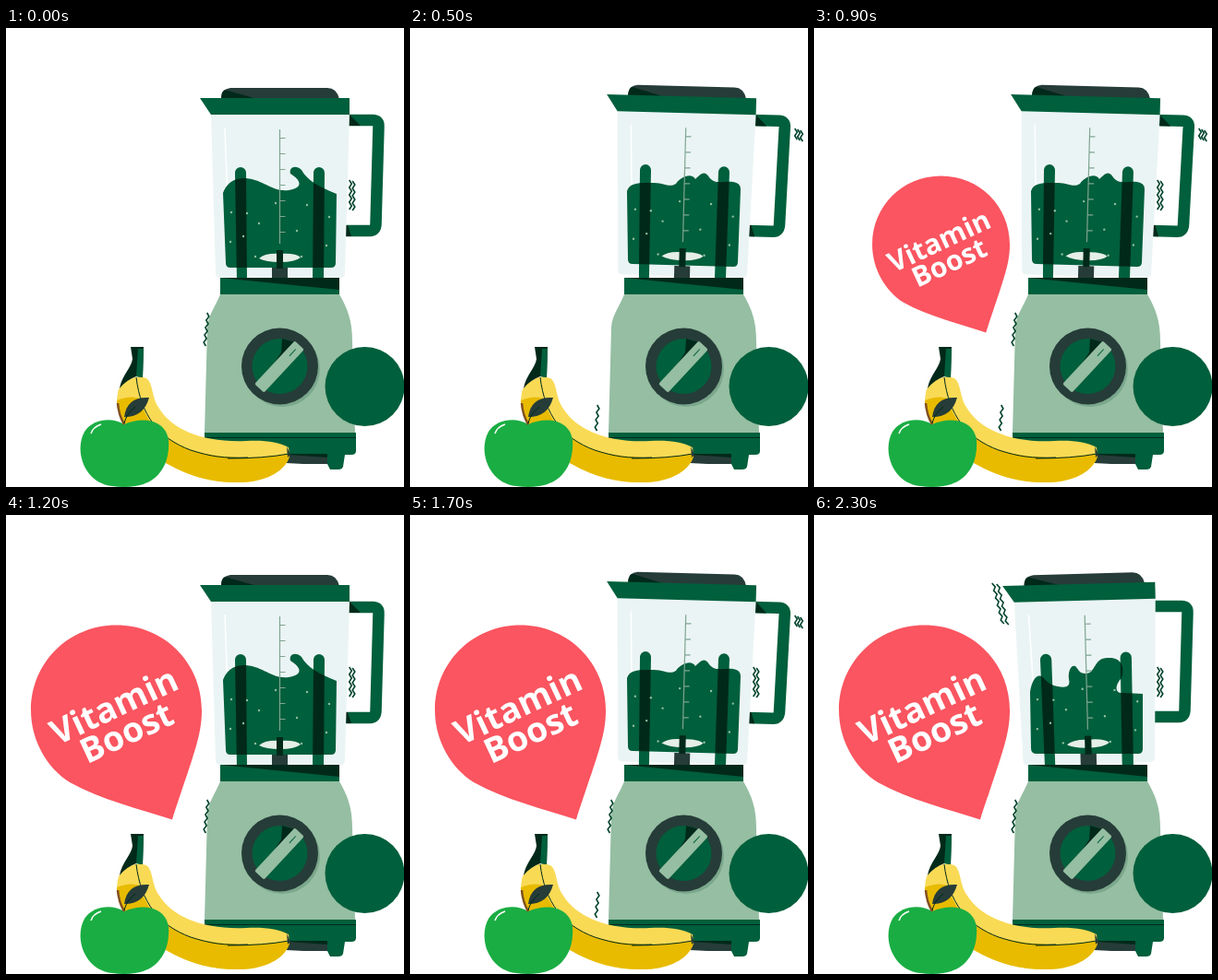
Write an HTML page that moves like this. It is 431 px wide and 498 px high and loops after 2.4 s.

```html
<!DOCTYPE html>
<html lang="en">
<head>
<meta charset="utf-8">
<title>Blender</title>
<style>
  html, body { margin: 0; width: 100%; height: 100%; overflow: hidden; background: #fff; }
  svg { display: block; width: 431px; height: 498px; }
  text { font: 700 37.5px "Open Sans", "Noto Sans", sans-serif; fill: #fff; text-anchor: middle; }
  .green { fill: #005f3c; }
  .deep { fill: #00291a; }
  .slate { fill: #263c38; }
  .mint { fill: #95bea2; }
  .line { fill: none; stroke: #00291a; stroke-width: 1; }
  .shake { fill: none; stroke: #00442c; stroke-width: 1.6; }
</style>
</head>
<body>
<svg viewBox="0 0 431 498">
  <g id="jars"></g>

  <!-- motor base -->
  <path class="slate" d="M300 461H348V473H322L303 472Z"/>
  <path class="deep" d="M300 461H348V466L306 463Z"/>
  <path class="green" d="M215 439H379V459Q379 463 374 463H367L365 476Q364 479 360 479H351L348 473V462H215Z"/>
  <path class="mint" d="M232 289H361C370 305 375 317 375 340L378 439H215L218 325C219 311 226 304 232 289Z"/>
  <path class="line" d="M215 444.5H379"/>
  <path class="green" d="M232 271H361V289H232Z"/>
  <path class="deep" d="M232 271H361V284Z"/>

  <!-- dial -->
  <circle cx="299" cy="370" r="41" fill="#7ba78c"/>
  <circle class="slate" cx="296.500" cy="367" r="41.5"/>
  <circle class="green" cx="296.500" cy="367" r="30"/>
  <path class="deep" d="M299 337L313 341L280 380L298 352Z"/>
  <g transform="translate(296 367.5) rotate(-47)">
    <rect class="mint" x="-32" y="-7" width="64" height="14" rx="2"/>
    <path d="M16 0H26" stroke="#005f3c"/>
  </g>

  <circle class="green" cx="388.5" cy="389" r="43"/>

  <!-- banana -->
  <path fill="#f9da55" d="M122 392C130 380 142 376 152 380C160 386 157 400 166 413C181 437 215 450 260 448C280 447 295 449 306 455L307 465C302 480 285 490 262 492.500C235 495 205 490 175 473C150 460 125 435 120 408Q120 398 122 392Z"/>
  <path fill="#e8bb00" d="M120 404Q134 398 145 402C150 425 168 446 200 458C235 468 270 468 307 462V465C302 480 285 490 262 492.500C235 495 205 490 175 473C150 460 125 435 120 408Z"/>
  <path class="line" d="M141 379C146 420 165 445 200 458C222 465 235 467 262 466M240 467Q280 467 306 462"/>
  <path class="deep" d="M135 346H149L148 379L141 378Q130 382 123 391C125 378 136 368 137 359Z"/>
  <path class="green" d="M143 348H149L148 379L141 378Z"/>
  <path class="slate" d="M304 454L308 463L305 466Z"/>

  <!-- apple -->
  <path fill="#1aad43" d="M128 430C115 422 94 424 85 438C73 460 86 494 115 497Q128 499 140 497C164 494 178 474 176 447C173 425 148 421 128 430Z"/>
  <path d="M92 440Q94 433 103 430" fill="none" stroke="#fff" stroke-width="1.5"/>
  <path d="M121 407Q122 420 128 430" fill="none" stroke="#805020" stroke-width="2.5"/>
  <path class="slate" d="M128 422C130 406 140 400 155 401C151 415 143 422 128 422Z"/>
  <path class="line" d="M128 429Q130 419 140 411"/>

  <g id="shakes"></g>

  <g id="drop">
    <path fill="#fa5560" d="M180 330.500C145 319 103 309 69 290C45 275 27 245 27 212C27 160 68 119.5 119.5 119.5C171 119.5 212 160 212 212C212 240 203 260 180 330.500Z"/>
    <g transform="translate(122.5 219) rotate(-25)">
      <text>Vitamin</text>
      <text y="32">Boost</text>
    </g>
  </g>
</svg>
<script>
const $ = id => document.getElementById(id);

// Jar poses: upright, tipped right, tipped left
const tipRight = "translate(-2 -2) rotate(1.5 290 271)";
const poses = [
  { move: "", grip: "", joints: true,
    liquid: "M235 179C238 170 246 162 260 163C280 165 288 178 306 176C320 174 322 167 308 158C306 151 314 148 320 154C326 165 338 172 358 180L357 255Q357 260 352 260H243Q238 260 238 255Z" },
  { move: tipRight, grip: tipRight, joints: true,
    liquid: "M235 177C238 167 250 168 262 168C275 167 280 174 288 169C292 162 305 156 309 164C314 160 318 153 324 162C330 170 338 166 350 167Q358 168 358 175L355 254Q355 259 350 259L241 256Q236 256 236 251Z" },
  { move: "translate(-5 -1) rotate(-1.5 290 271) scale(1.02 1)", grip: "translate(1 -1)", joints: false,
    liquid: "M234 192C236 178 242 171 248 176C254 183 258 185 264 186C273 188 278 186 276 178C275 170 278 162 283 164C287 168 287 172 294 172C306 172 302 155 318 155C333 154 337 165 333 177C326 184 325 194 335 193L356 194V254Q356 259 351 259H241Q235 259 235 253Z" }
];

const specks = [[244,200],[261,201],[274,212],[292,190],[315,220],[326,192],[350,205],
  [243,232],[257,226],[347,236],[270,248],[320,248]];
const bars = '<path d="M248 157a6 6 0 0 1 12 0L261 275H250ZM333 157a6 6 0 0 1 12 0L344 275H332Z"/>';
const ticks = [...Array(7)].map((_, i) => `M296.5 ${119.5 + 17 * i}h6`).join("");
const dots = specks.map(([x, y]) => `<circle cx="${x}" cy="${y}" r="1.2"/>`).join("");

const jar = ({ move, grip, joints, liquid }, i) => `<g>
  <g transform="${grip}">
    <path d="M368 100H397Q404 100 403.5 107L400.5 213Q400 220 394 220H366" fill="none" stroke="#005f3c" stroke-width="12.5"/>
    ${joints ? '<path class="deep" d="M372 94L384 106H372ZM368 214H370L374 226H367Z"/>' : ""}
  </g>
  <g transform="${move}">
    <path class="slate" d="M233 77Q233 66 243 65H348Q358 65 361 77Z"/>
    <path class="deep" d="M233 77Q233 69 237 67L272 77Z"/>
    <path fill="#ebf4f4" d="M222 93H372L367 266Q367 271 362 271H232Q227 271 227 266Z"/>
    <path class="green" d="M210 76H372V94H222Z"/>
    <path d="M237 108L240 189" stroke="#fff" stroke-width="1.5"/>
    <g class="green">${bars}</g>
  </g>
  <clipPath id="fill${i}"><path d="${liquid}"/></clipPath>
  <path class="green" d="${liquid}"/>
  <g clip-path="url(#fill${i})"><g class="deep" transform="${move}">${bars}</g></g>
  <g transform="${move}">
    <g fill="#8fbd9f">${dots}</g>
    <path d="M296.5 110V234${ticks}" fill="none" stroke="#7fa591" stroke-width="1.2"/>
    <path class="slate" d="M288 260H305V273H288Z"/>
    <path fill="#e6eee8" d="M274 250Q280 244 297 245Q314 244 319 249Q313 254 297 254Q281 254 274 250Z"/>
    <path class="deep" d="M293 241H300V261H293Z"/>
  </g>
</g>`;

// Parallel zigzags running from (x, y), leaning by slant over their height
function zigzags(x, y, height, slant, count, gap) {
  let d = "";
  for (let c = 0; c < count; c++) {
    for (let k = 0; k * 4 <= height; k++) {
      const px = x + c * gap + slant * k * 4 / height + (k % 2 ? 1.3 : -1.3);
      d += `${k ? "L" : "M"}${px} ${y + k * 4 + c}`;
    }
  }
  return `<path d="${d}"/>`;
}

$("jars").innerHTML = poses.map(jar).join("");
$("shakes").innerHTML = [
  zigzags(373, 165, 33, 0, 2, 3.5) + zigzags(219, 309, 36, -4, 1, 0),
  zigzags(418, 109, 12, 0, 3, 3) + zigzags(204, 409, 30, -3, 1, 0),
  zigzags(194, 74, 46, 11, 2, 5)
].map(s => `<g class="shake">${s}</g>`).join("");

const jars = [...$("jars").children], shakes = [...$("shakes").children];
const show = (el, on) => el.style.display = on ? "" : "none";

function draw() {
  const step = Math.floor(performance.now() % 2400 / 100);
  const pose = [0, 1, 0, 2][step % 4];
  jars.forEach((el, i) => show(el, i === pose));
  shakes.forEach((el, i) => show(el, i === pose || (i === 0 && step > 6)));

  // The drop grows from its lower right corner with a small overshoot
  const scale = step === 11 ? 1.043 : Math.min(1, 0.22 + (step - 6) * 0.195);
  show($("drop"), step > 5);
  $("drop").setAttribute("transform", `translate(212 330) scale(${scale}) translate(-212 -330)`);
  requestAnimationFrame(draw);
}
draw();
</script>
</body>
</html>
```
